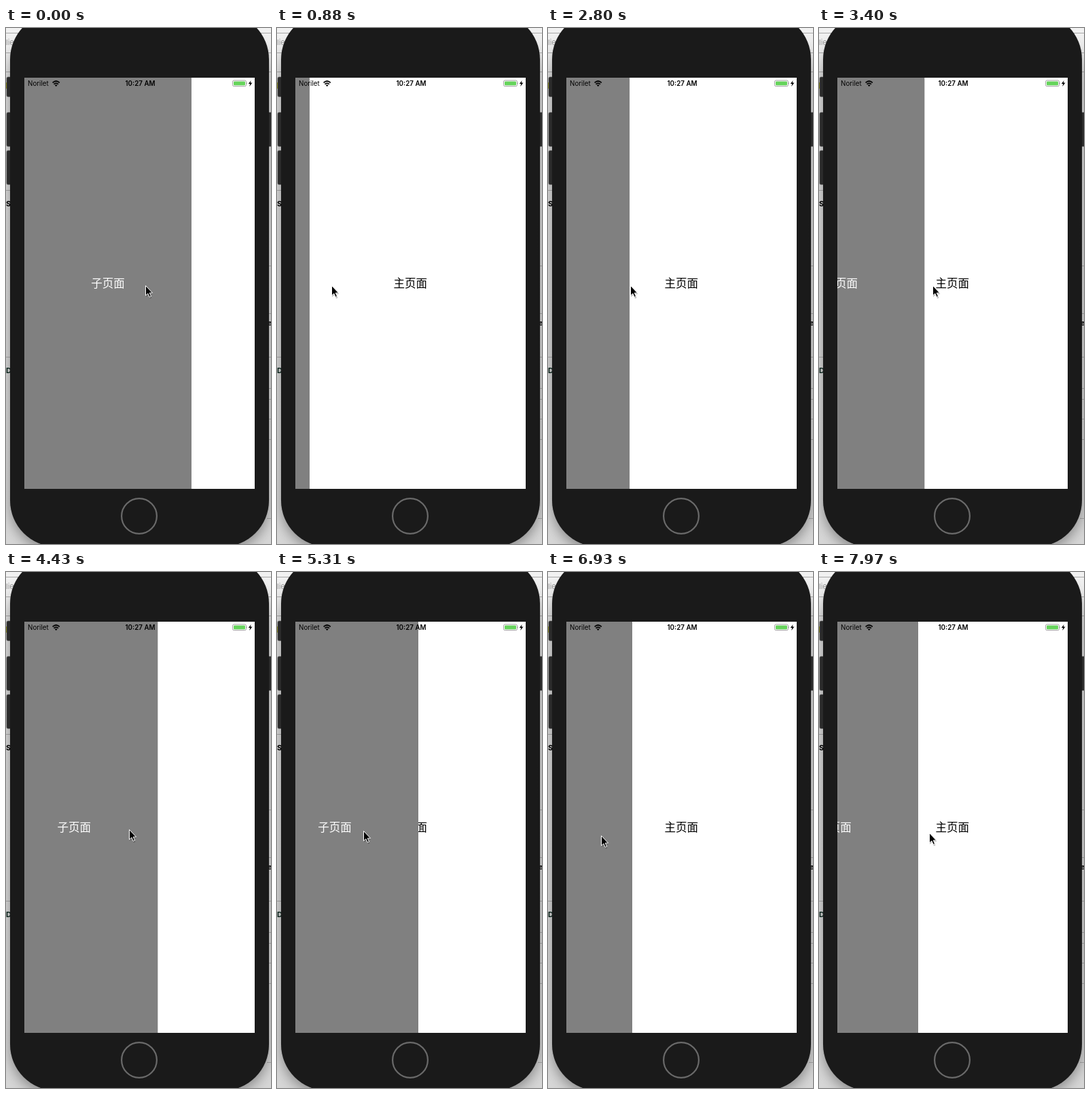
Animation, 390 px wide and 758 px high, one loop 8000 ms. Source, as an HTML page:

```html
<!DOCTYPE html>
<html lang="zh">
<head>
<meta charset="utf-8">
<style>
html, body { margin: 0; width: 100%; height: 100%; overflow: hidden; background: #e4e4e4; }
svg { display: block; }
text { font-family: Inter, Roboto, sans-serif; }
.page { font: 16.5px "Noto Sans CJK SC", "Noto Sans CJK", sans-serif; text-anchor: middle; }
.status { font-size: 9.8px; }
</style>
</head>
<body>
<svg width="390" height="758" viewBox="0 0 390 758">
  <defs>
    <linearGradient id="desk" x2="0" y2="1">
      <stop offset="0" stop-color="#f2f2f2"/>
      <stop offset=".12" stop-color="#dedede"/>
      <stop offset="1" stop-color="#d6d6d6"/>
    </linearGradient>
    <filter id="blur" x="-20%" width="140%"><feGaussianBlur stdDeviation="9"/></filter>
    <clipPath id="screen"><path d="M27 73H366V677H27Z"/></clipPath>
  </defs>

  <!-- desktop behind the phone -->
  <path fill="url(#desk)" d="M0 0H390V758H0Z"/>
  <path stroke="#a8a8a8" d="M0 7.5H390M0 36.5H390M0 64.5H390M0 238.5H9M0 483.5H9M384 349.5H390M384 419.5H390M384 483.5H390M384 529.5H390M384 545.5H390M384 574.5H390M384 604.5H390M384 720.5H390"/>
  <rect x="6" y="4" width="381" height="764" rx="66" opacity=".35" filter="url(#blur)"/>
  <g font-size="11">
    <text x="0" y="25" fill="#999">lie</text>
    <g font-weight="700">
      <text x="0" y="262">S</text>
      <text x="0" y="507" fill="#0c241c">D</text>
      <text x="385" y="437">e</text>
    </g>
  </g>

  <!-- phone -->
  <g fill="#2b2b2b" stroke="#555" stroke-width=".6">
    <rect x="1" y="72" width="9" height="29" rx="2"/>
    <rect x="1" y="124" width="9" height="50" rx="2"/>
    <rect x="1" y="180" width="9" height="50" rx="2"/>
    <rect x="382" y="124" width="10" height="50" rx="2"/>
  </g>
  <path fill="#8a8a20" d="M0 80h1v9h-1z"/>
  <rect x="6" y="-22" width="381" height="784" rx="68" fill="#1a1a1a"/>
  <circle cx="196" cy="717" r="25.9" fill="none" stroke="#6a6a6a" stroke-width="2.2"/>

  <!-- screen -->
  <g clip-path="url(#screen)">
    <path fill="#fff" d="M27 73H366V677H27Z"/>
    <text class="page" x="196.3" y="381">主页面</text>
    <g id="drawer">
      <path fill="#808080" d="M-246 73H0V677H-246Z"/>
      <text class="page" x="-123" y="381" fill="#fff">子页面</text>
    </g>
    <g class="status">
      <text x="32" y="85">Norilet</text>
      <text x="197.5" y="85" font-weight="600" text-anchor="middle">10:27 AM</text>
    </g>
    <g fill="none" stroke="#000" stroke-width="1.8">
      <path d="M68.6 80.4Q73.7 75.6 78.8 80.4M70.5 82.6Q73.7 79.6 76.9 82.6"/>
      <path fill="#000" stroke="none" d="M71.8 84L73.7 86 75.6 84Q73.7 82.4 71.8 84Z"/>
    </g>
    <rect x="333.5" y="77" width="20" height="8.6" rx="2" fill="#fff" stroke="#8c8c8c" stroke-width=".8"/>
    <rect x="335" y="78.4" width="17" height="5.8" rx="1" fill="#65d35b"/>
    <path fill="#8c8c8c" d="M354.4 79.8q1.4 1.5 0 3z"/>
    <path d="M360.6 77L356.8 82H359.2L358.2 86 362.4 80.6H359.8Z"/>
  </g>

  <g id="cursor">
    <path d="M1 2V17L4.5 14 7 19.5 9.5 18.5 7 13H11.5Z" opacity=".25"/>
    <path d="M.5 .5V15L3.8 12 6.2 17.3 8.6 16.3 6.2 11.2H10.6Z" stroke="#fff"/>
  </g>
</svg>
<script>
const LOOP = 8000, STEP = 147.5;
// start and end time, drawer edge and cursor x reached; both rest in between
const moves = [
  [0, 880, 48, 80], [880, 1475, 48, 46],            // close
  [1622, 2065, 168.5, 166], [2212, 2950, 108, 110], // pull out, back,
  [2950, 3392, 155.3, 167], [3392, 4130, 195, 181], // out again
  [4341, 4572, 273, 181],                           // snap open
  [4868, 5310, 208, 127], [5310, 5605, 150, 75],    // push in
  [5605, 6342, 257, 156], [6342, 6785, 200, 95],
  [6785, 7080, 48, 60], [7080, 7375, 48, 45],       // snap shut
  [7522, 7965, 146, 162]                            // pull out
];
const drawer = document.getElementById('drawer');
const cursor = document.getElementById('cursor');
const clamp01 = v => Math.min(1, Math.max(0, v));

function pose(t) {
  let edge = 273, x = 205;
  for (const [start, end, toEdge, toX] of moves) {
    const p = clamp01((t - start) / (end - start));
    edge += (toEdge - edge) * p;
    x += (toX - x) * p;
  }
  // the hand sinks a little towards the end
  const y = 378 + Math.round(9.5 * Math.exp(-(((t - 7000) / 1300) ** 2)));
  return { edge, x: Math.round(x), y };
}

function draw(now) {
  const step = Math.floor((now % LOOP + 10) / STEP);
  const { edge, x, y } = pose(step * STEP);
  drawer.setAttribute('transform', `translate(${edge})`);
  cursor.setAttribute('transform', `translate(${x} ${y})`);
  requestAnimationFrame(draw);
}
draw(performance.now());
</script>
</body>
</html>
```
